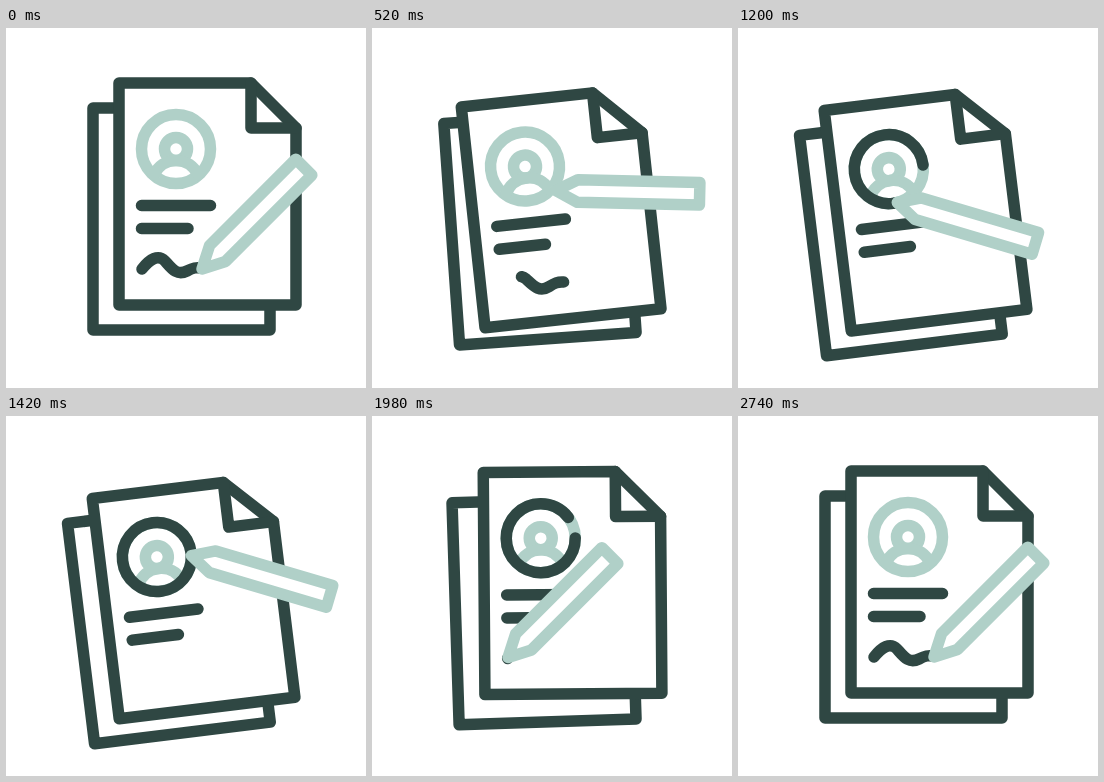
An HTML page for the animation above (3 s loop, 360 by 360 pixels).

```html
<!DOCTYPE html>
<html>
<head>
<meta charset="utf-8">
<style>
  html, body { margin: 0; height: 100%; overflow: hidden; background: #fff; }
  svg { display: block; width: 100vw; height: 100vh; }
  path, circle { fill: none; stroke: #2f4743; stroke-width: 11.5; stroke-linecap: round; stroke-linejoin: round; }
  .light { stroke: #b0d0c8; }
  .paper { fill: #fff; }
</style>
</head>
<body>
<svg viewBox="0 0 360 360">
  <path id="back" d="M113 80H87V302H264V277"/>
  <g id="front">
    <path class="paper" d="M113 55H245L290 100V277H113Z"/>
    <path d="M245 55V100H290M135.5 177.5H204.5M135.5 200.5H182"/>
    <circle class="light" cx="170" cy="121" r="34.5"/>
    <circle class="light" cx="170" cy="121" r="11.5"/>
    <path class="light" d="M148 147C152 138 160 132.5 170 132.5S188 138 192 147"/>
    <path id="ring" pathLength="1" d="M204.5 121A34.5 34.5 0 0 0 135.5 121A34.5 34.5 0 0 0 204.5 121"/>
    <path id="sign" pathLength="1" d="M136 241C144 231 152 226 159 233C166 241 171 248 181 243C187 240 190 239 196 240"/>
  </g>
  <path id="pencil" class="light paper" d="M0 0L22 -11.3H144V11.3H22Z"/>
</svg>
<script>
const [back, front, ring, sign, pencil] =
  ['back', 'front', 'ring', 'sign', 'pencil'].map(id => document.getElementById(id));
const LOOP = 3000, TILT = -7;
const signLength = sign.getTotalLength();

// Eased progress of t from start to end
const ease = (t, start, end) => {
  const p = Math.min(1, Math.max(0, (t - start) / (end - start)));
  return (1 - Math.cos(Math.PI * p)) / 2;
};
const mix = (a, b, p) => a + (b - a) * p;

// Show only the part of a path between two fractions of its length
function trim(path, from, to, visible) {
  path.style.display = visible ? '' : 'none';
  path.setAttribute('stroke-dasharray', `${to - from} 9`);
  path.setAttribute('stroke-dashoffset', -from);
}

function draw(t) {
  const frontTilt = TILT * (ease(t, 220, 610) - ease(t, 1393, 2093));
  const backTilt = TILT * (ease(t, 295, 705) - ease(t, 1520, 2220));
  front.setAttribute('transform', `rotate(${frontTilt} 325 288)`);
  back.setAttribute('transform', `rotate(${backTilt} 298 302)`);

  const lap = ease(t, 595, 1485);
  const writing = ease(t, 1970, 2740);
  trim(ring, ease(t, 1820, 2600), lap, t >= 990 && t < 2600);
  if (t < 1000) trim(sign, ease(t, 220, 999), 1, true);
  else trim(sign, 0, writing, t > 1970);

  // The pencil tip circles the portrait, then follows the signature
  const turn = (TILT - 360 * lap) * Math.PI / 180;
  const orbitX = 151 + 34.5 * Math.cos(turn);
  const orbitY = 141 + 34.5 * Math.sin(turn);
  const away = ease(t, 220, 670) - ease(t, 1455, 1900);
  const pen = sign.getPointAtLength(signLength * (t < 1000 ? 1 : writing));
  const x = mix(pen.x, orbitX, away) - 6 * Math.sin(Math.PI * away);
  const y = mix((pen.y + 242) / 2, orbitY, away);
  pencil.setAttribute('transform', `translate(${x} ${y}) rotate(${mix(-45, 16.5, away)})`);
}

const begin = performance.now();
function tick() {
  draw((performance.now() - begin) % LOOP);
  requestAnimationFrame(tick);
}
tick();
</script>
</body>
</html>
```
